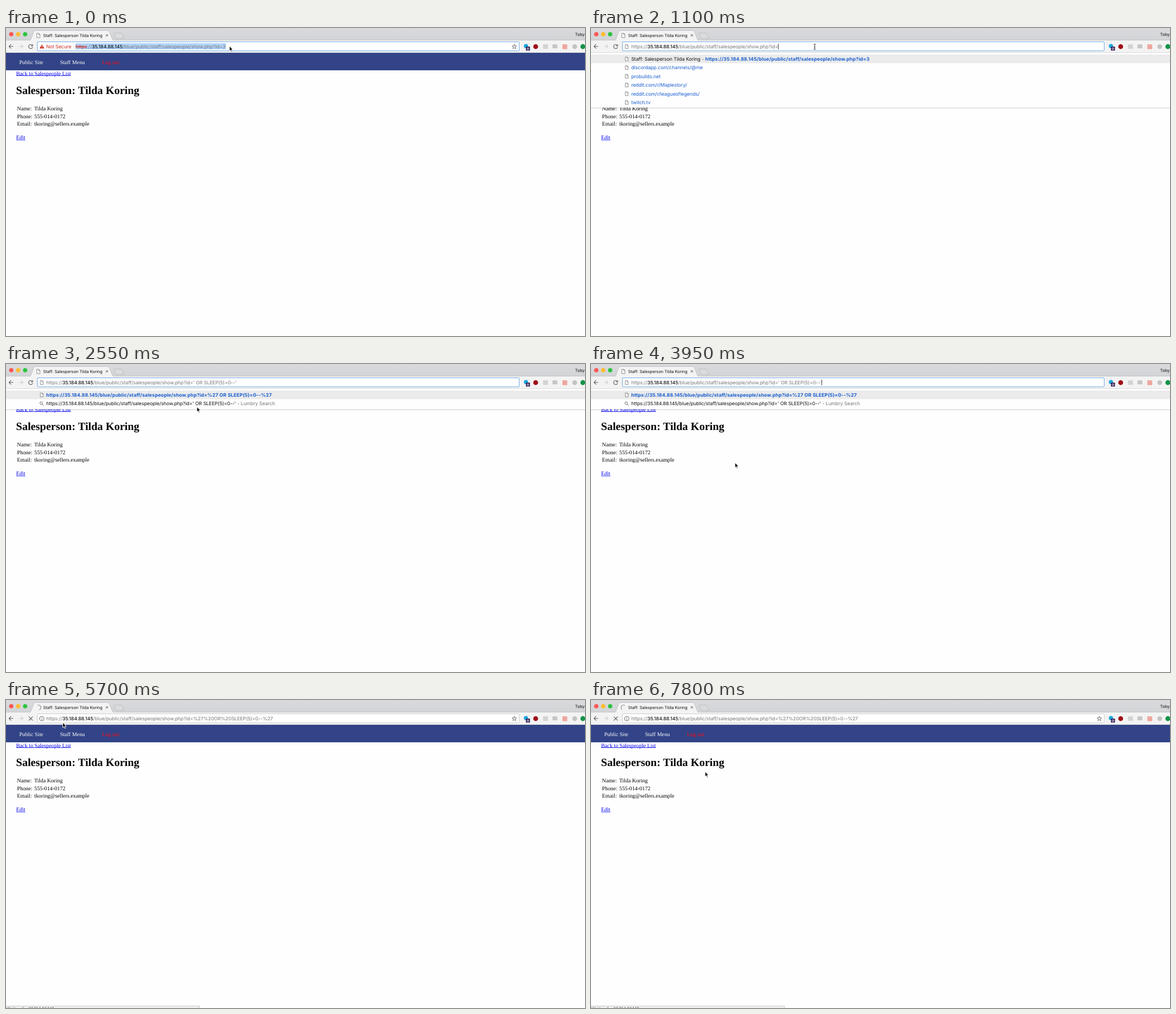
Write an HTML page with a canvas that moves like this. It is 1025 by 546 pixels and loops after 8000 ms.

```html
<!DOCTYPE html>
<html lang="en">
<head>
<meta charset="utf-8">
<title>Browser address bar</title>
<style>
html, body { margin: 0; width: 100%; height: 100%; overflow: hidden; background: #fefefe; }
canvas { display: block; }
</style>
</head>
<body>
<canvas id="stage" width="1025" height="546"></canvas>
<script>
const ctx = document.getElementById('stage').getContext('2d');
ctx.textRendering = 'geometricPrecision';

const LOOP = 8000;
const UI = 'Inter, Roboto, sans-serif';
const SERIF = '"Liberation Serif", "Noto Serif", serif';
const BLUE = '#1a5fd0', GREY = '#757575', INK = '#111', ICON = '#5c5c5c';

const PERSON = 'Tilda Koring';
const HOST = '35.184.88.145';
const PATH = '/blue/public/staff/salespeople/show.php?id=';
const URL_BASE = 'https://' + HOST + PATH;
const INJECT = "' OR SLEEP(5)=0--'";
const ENCODED = '%27%20OR%20SLEEP(5)=0--%27';

const steps = [
  [0, 395.5, 32], [210], [500], [890], [1100], [1300], [1510], [1720], [1930],
  [2130, 390, 36], [2340, 372, 50], [2550, 338, 76], [2750, 300, 103], [2960, 265, 121], [3170, 251, 128],
  [3380, 255, 175], [3950], [4190], [4390], [4630], [4840],
  [5080, 250, 168], [5290, 206, 120], [5490, 140, 66], [5700, 100.5, 40], [5910, 88, 44], [6120, 74, 52],
  [6320, 52, 58], [6530, 64, 66], [6760, 180, 82], [6970, 330, 91], [7180, 429, 90],
  [7380, 385, 101], [7590, 285, 116], [7800, 202, 127]
];

const plain = s => [s, BLUE];
const bold = s => [s, BLUE, 700];
const menus = {
  history: [
    [['Staff: Salesperson ' + PERSON, INK], [' - ', GREY], bold(URL_BASE + '3')],
    ...['discordapp.com/channels/@me', 'probuilds.net', 'reddit.com/r/Maplestory/',
      'reddit.com/r/leagueoflegends/', 'twitch.tv'].map(s => [plain(s)])
  ],
  edited: [
    [bold(URL_BASE)],
    [bold(URL_BASE), plain('%27 OR SLEEP(3)=0--%27')],
    [[URL_BASE, INK], [' - Lumbry Search', GREY]]
  ],
  pasted: [
    [bold(URL_BASE + '%27 OR SLEEP(5)=0--%27')],
    [[URL_BASE + INJECT, INK], [' - Lumbry Search', GREY]]
  ]
};

function text(str, x, y, size, color = INK, family = UI, weight = 400) {
  ctx.font = `${weight} ${size}px ${family}`;
  ctx.letterSpacing = family === SERIF ? '0px' : weight === 700 ? '0.115px' : '-0.06px';
  ctx.fillStyle = color;
  ctx.fillText(str, x, y);
  return x + ctx.measureText(str).width;
}

const runs = (parts, x, y) =>
  parts.reduce((at, [str, color, weight]) => text(str, at, y, 8.54, color, UI, weight), x);

function rect(x, y, w, h, color) {
  ctx.fillStyle = color;
  ctx.fillRect(x, y, w, h);
}

function disc(x, y, r, color) {
  ctx.fillStyle = color;
  ctx.beginPath();
  ctx.arc(x, y, r, 0, 7);
  ctx.fill();
}

function shape(d, x, y, { fill, stroke, width = 1 }) {
  const path = new Path2D(d);
  ctx.save();
  ctx.translate(x, y);
  if (fill) { ctx.fillStyle = fill; ctx.fill(path); }
  if (stroke) { ctx.strokeStyle = stroke; ctx.lineWidth = width; ctx.stroke(path); }
  ctx.restore();
}

const fileIcon = (x, y, k = 1) =>
  shape(`M${-2.5 * k} ${-3.5 * k}h${3 * k}l${2 * k} ${2 * k}v${5 * k}h${-5 * k}zM${.5 * k} ${-3.5 * k}v${2 * k}h${2 * k}`,
    x, y, { fill: '#fff', stroke: '#747474', width: .8 });

function link(str, x, y) {
  const end = text(str, x, y, 9.76, '#0000ee', SERIF);
  rect(x, Math.round(y + .6), end - x, 1, '#3c3cf2');
}

function drawPage() {
  rect(0, 0, 1025, 546, '#fefefe');
  rect(0, 44, 1025, 31, '#324487');
  text('Public Site', 23.4, 63.5, 9.76, '#fff', SERIF);
  text('Staff Menu', 95.7, 63.5, 9.76, '#fff', SERIF);
  text('Log out', 170, 63.5, 9.76, '#ff0a14', SERIF);
  link('Back to Salespeople List', 18, 83.8);
  text('Salesperson: ' + PERSON, 17.8, 117, 19.52, '#000', SERIF, 700);
  [['Name:', PERSON], ['Phone:', '555-014-0172'], ['Email:', 'tkoring@sellers.example']].forEach(([label, value], i) => {
    text(label, 19.6, 146 + i * 13.5, 9.76, '#000', SERIF);
    text(value, 50, 146 + i * 13.5, 9.76, '#000', SERIF);
  });
  link('Edit', 18, 197);
}

function drawTabs(t, loading) {
  const strip = ctx.createLinearGradient(0, 0, 0, 22);
  strip.addColorStop(0, '#d9dadc');
  strip.addColorStop(1, '#d2d4d7');
  rect(0, 0, 1025, 22, strip);
  rect(0, 21, 1025, 1, '#c4c6c8');
  ['#fc5652', '#fdbb2f', '#2cc23f'].forEach((c, i) => disc(9.3 + i * 12.3, 11, 3.8, c));
  shape('M42 22Q43.5 21.500 44 20L49 6.500Q49.800 4.500 52 4.500H180Q182.200 4.500 183 6.500L188.500 20Q189 21.500 191 22',
    0, 0, { fill: '#f3f3f3', stroke: '#b4b6b8', width: .7 });
  shape('M191 9.5Q190.5 9 193 9H203Q205 9 206 11L209 17Q210 18.5 208 18.5H197Q195 18.5 194 16.5Z', 0, 0,
    { fill: '#d9dbdd', stroke: '#b2b4b7', width: .7 });
  if (loading) drawSpinner(t); else fileIcon(57.3, 13.2, 1.1);
  text('Staff: Salesperson ' + PERSON, 65.8, 15.6, 7.32);
  shape('M-2-2L2 2M2-2L-2 2', 178.6, 13, { stroke: '#555' });
  text('Toby', 1007.5, 13.5, 7.32);
}

// Counter-clockwise arc that grows to half a turn
function drawSpinner(t) {
  const turned = (t - 4083) / 1543 * 2 * Math.PI;
  const top = -Math.PI / 2;
  ctx.strokeStyle = '#858585';
  ctx.lineWidth = 1.1;
  ctx.beginPath();
  ctx.arc(57.5, 13.3, 4.3, top - Math.max(0, turned - Math.PI), top - turned, true);
  ctx.stroke();
}

function drawToolbar(focused, loading, star) {
  rect(0, 22, 1025, 22, '#f3f3f3');
  rect(0, 43, 1025, 1, '#dadada');
  shape('M4 0H-3.5M0-3.7L-3.7 0L0 3.7', 9, 32.7, { stroke: ICON, width: 1.1 });
  shape('M-4 0H3.5M0-3.7L3.7 0L0 3.7', 26.5, 32.7, { stroke: '#cfcfcf', width: 1.1 });
  if (loading) {
    shape('M-3.5-3.5L3.5 3.5M3.5-3.5L-3.5 3.5', 43.8, 32.8, { stroke: ICON, width: 1.1 });
  } else {
    shape('M2.8-2.2A3.6 3.6 0 1 0 3.5 1', 43.6, 32.8, { stroke: ICON, width: 1.1 });
    shape('M4-4.2V-.5H.3Z', 43.6, 32.8, { fill: ICON });
  }
  ctx.beginPath();
  ctx.roundRect(55.5, 24.5, 853, 16, 1.5);
  ctx.fillStyle = '#fff';
  ctx.fill();
  ctx.strokeStyle = focused ? '#72aeea' : '#cfcfcf';
  ctx.lineWidth = 1;
  ctx.stroke();
  if (star) {
    shape('M0-4L1.1-1.3L4-1.2L1.8.7L2.5 3.5L0 1.9L-2.5 3.5L-1.8.7L-4-1.2L-1.1-1.3Z',
      900, 33, { stroke: '#606060', width: .9 });
  }
  disc(920.5, 32, 3.8, '#20a8dc');
  rect(920.5, 33, 7, 7, '#331a50');
  text('0', 922.1, 38.8, 6, '#fff', UI, 700);
  disc(937.7, 33, 4.3, '#a00d18');
  rect(950.8, 29, 8.5, 8, '#d3d3d3');
  rect(967.5, 29, 8.5, 7, '#c6c6c6');
  rect(985, 29, 8.5, 8.5, '#eea69f');
  disc(1006.8, 33, 4.2, '#c3c3c3');
  disc(1021.2, 33, 4.4, '#159447');
}

function drawAddress(t, loading) {
  const y = 36.1;
  if (t < 890) {
    shape('M0-3.9L4.2 3.5H-4.2Z', 63.6, 32.8, { fill: '#c9271d' });
    rect(63.2, 31.3, .9, 2.6, '#fff');
    rect(63.2, 34.6, .9, .9, '#fff');
    text('Not Secure', 71, y, 8.54, '#c9271d');
    rect(119, 27, .6, 12, '#d8d8d8');
    if (t < 500) rect(123, 27, 266.5, 11, '#b2d5fb');
    const schemeEnd = runs([['https', '#c9271d']], 123.2, y);
    rect(123, 32.8, schemeEnd - 123, .9, '#c9271d');
    runs([['://', GREY], [HOST, INK, 500], [PATH + '3', GREY]], schemeEnd, y);
    return;
  }
  const query = loading ? ENCODED : t < 1720 ? '' : INJECT;
  if (loading) {
    shape('M4 0A4 4 0 1 1-4 0A4 4 0 1 1 4 0', 63.4, 33, { stroke: ICON, width: .9 });
    rect(63, 30.7, .9, 1, ICON);
    rect(63, 32.5, .9, 2.8, ICON);
  } else {
    fileIcon(63.3, 32.9);
  }
  const end = runs([['https://', GREY], [HOST, INK, 500], [PATH + query, GREY]], 71.2, y);
  const caretOff = t >= 2550 && t < 2960;
  if (!loading && !caretOff) rect(end, 27.8, .8, 10, '#111');
}

function drawMenu(rows) {
  const rowHeight = 15.4, bottom = Math.round(49 + rows.length * rowHeight);
  const shadow = ctx.createLinearGradient(0, bottom, 0, bottom + 3);
  shadow.addColorStop(0, 'rgba(0,0,0,.14)');
  shadow.addColorStop(1, 'rgba(0,0,0,0)');
  rect(0, bottom, 1025, 3, shadow);
  rect(0, 44, 1025, bottom - 44, '#fefefe');
  rect(0, 47, 1025, rowHeight, '#ebebeb');
  rows.forEach((parts, i) => {
    const y = 54.8 + i * rowHeight;
    const isSearch = parts.length > 1 && parts[1][0].endsWith('Search');
    if (isSearch) shape('M1.2-.8A2.3 2.3 0 1 1-3.4-.8A2.3 2.3 0 1 1 1.2-.8M.6.9L3.5 3.7', 63.4, y, { stroke: '#707070' });
    else fileIcon(63.3, y);
    runs(parts, 71.2, y + 3.1);
  });
}

function drawStatus() {
  rect(0, 542.3, 343, 4, '#b9b9b9');
  rect(0, 543, 342.3, 3, '#f0f0f0');
  text('Waiting for ' + HOST + '...', 1, 550, 7.32, '#333');
}

function drawPointer(x, y, beam) {
  if (beam) {
    shape('M-2-4.5Q0-4.5 0-3.5Q0-4.5 2-4.5M0-3.5V4M-2 5Q0 5 0 4Q0 5 2 5M-1 .8H1', x + .5, y + 1, { stroke: '#222', width: .9 });
  } else {
    shape('M0 0V9L2.1 7.1L3.6 10.5L5 9.9L3.5 6.6H6.3Z', x, y, { fill: '#000', stroke: '#fff', width: .9 });
  }
}

function menuAt(t) {
  if (t < 210 || t >= 4190) return null;
  return t < 1300 ? menus.history : t < 1930 ? menus.edited : menus.pasted;
}

function draw(now) {
  const shown = steps.filter(s => s[0] <= now % LOOP);
  const t = shown.at(-1)[0];
  const [, x, y] = shown.findLast(s => s.length > 1);
  const loading = t >= 4190;
  const menu = menuAt(t);
  drawPage();
  if (menu) drawMenu(menu);
  drawTabs(t, loading);
  drawToolbar(!loading, loading, t < 890 || loading);
  drawAddress(t, loading);
  if (t >= 4630) drawStatus();
  drawPointer(x, y, t >= 1100 && t < 1510);
}

const start = performance.now();
function tick() {
  draw(performance.now() - start);
  requestAnimationFrame(tick);
}
tick();
</script>
</body>
</html>
```
